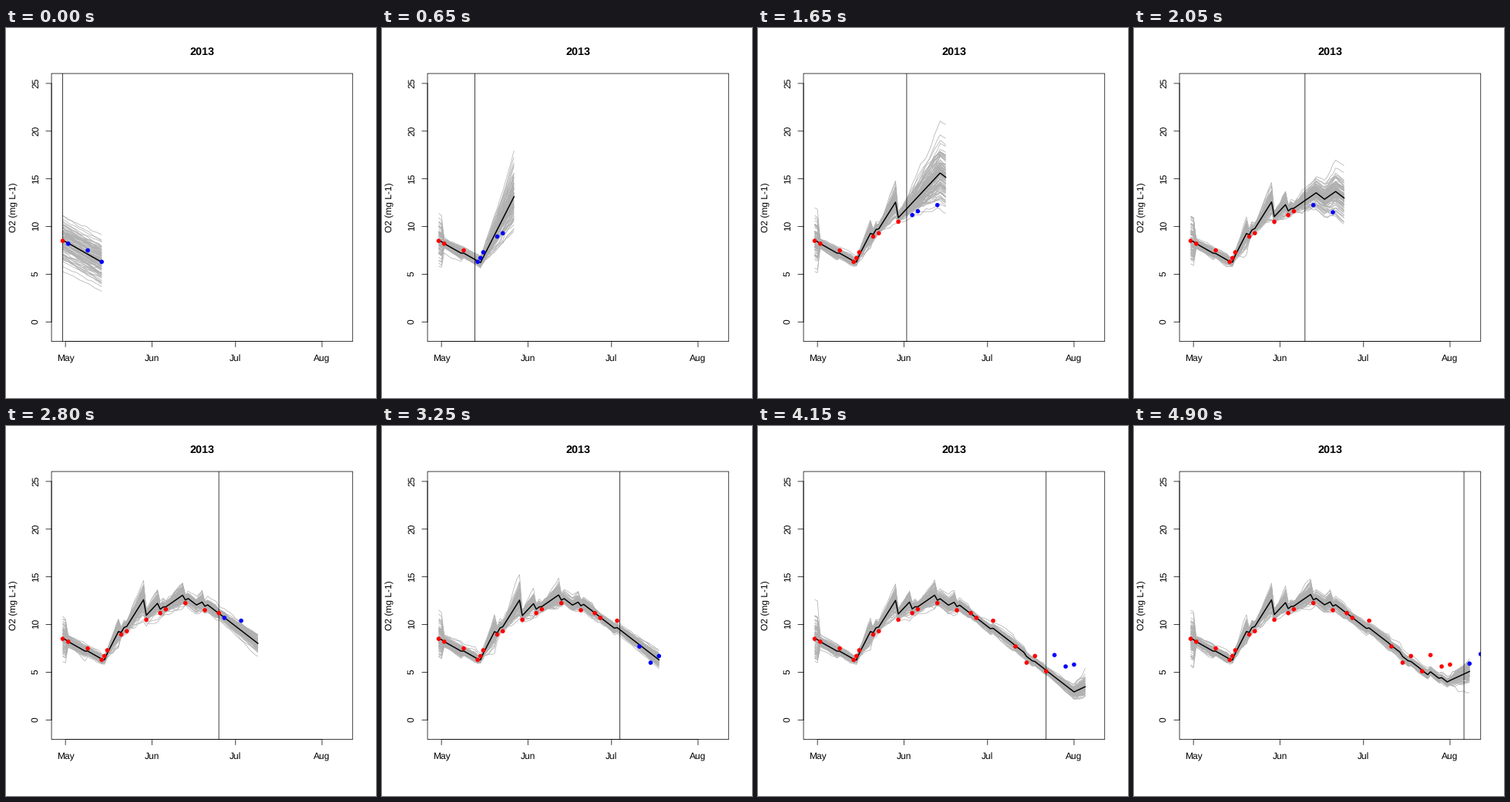
These frames come from a looping animation (480 by 480 pixels, 4950 ms). A matplotlib script:

```python
import numpy as np
import matplotlib.pyplot as plt
from matplotlib.animation import FuncAnimation
from matplotlib.collections import LineCollection
from matplotlib.patches import Rectangle

plt.rcParams["font.family"] = "Liberation Sans"
plt.rcParams["text.hinting"] = "none"

SIZE, DPI = 480, 72
FRAMES, INTERVAL = 99, 50
LEFT, RIGHT, TOP, BOTTOM = 59.04, 449.76, 59.04, 406.56
THIN, THICK = 0.75, 1.5
LAST_DAY, HORIZON, MEMBERS = 100, 14, 100
OBS_SD, JITTER_SD = 0.45, 0.25

# weekly sampling with a few extra visits
DAYS = np.array(sorted({*range(2, 59, 7), *range(72, 101, 7), *range(76, 91, 7),
                        0, 14, 15, 21, 35, 56, 64, 104}))
OXYGEN = np.array([8.5, 8.2, 7.5, 6.3, 6.7, 7.3, 8.95, 9.3, 10.5, 11.2, 11.6,
                   12.25, 11.5, 11.2, 10.7, 10.4, 7.7, 6, 6.7, 5.1, 6.8, 5.6,
                   5.8, 5.9, 6.9])
MEASURED = dict(zip(DAYS, OXYGEN))


def px(day):
    return LEFT + (np.asarray(day) + 4) / 108 * (RIGHT - LEFT)


def py(value):
    return BOTTOM - (np.asarray(value) + 2.04) / 28.08 * (BOTTOM - TOP)


def is_bright(day):
    return 15 <= day < 45 or 48 <= day < 52 or day >= 93


def production(day):
    """Daily growth as learned from the measurements up to a day."""
    return 0.36 + 0.44 * np.exp(-(max(day - 14, 0) / 16.8) ** 2)


def simulate(today):
    """Ensemble filter up to today, then a free forecast."""
    rng = np.random.default_rng(700 + today)
    end = min(today + HORIZON, LAST_DAY)
    mean, dev = 8.58, rng.normal(0, 1.1, MEMBERS)
    means, members = [], []
    for day in range(end + 1):
        measured = day in MEASURED and day <= today
        if measured:
            growth = production(day)
            growth_dev, loss_dev = rng.normal(size=(2, MEMBERS))
        if measured and day > 0:
            gain = dev.var() / (dev.var() + OBS_SD ** 2)
            mean += gain * (MEASURED[day] - mean)
            dev = (1 - gain) * dev + gain * rng.normal(0, JITTER_SD, MEMBERS)
        dev = dev - dev.mean()
        means.append(mean)
        members.append(mean + dev)

        bright = is_bright(day)
        mean += growth * bright - (0.165 if day < 15 else 0.225)
        dev = (dev + 0.17 * growth * bright * growth_dev + 0.018 * loss_dev
               + rng.normal(0, 0.15 if bright else 0.06, MEMBERS))
    return px(np.arange(end + 1)), py(means), py(members).T


fig = plt.figure(figsize=(SIZE / DPI, SIZE / DPI), dpi=DPI, facecolor="white")
ax = fig.add_axes([0, 0, 1, 1])
ax.set_xlim(0, SIZE)
ax.set_ylim(SIZE, 0)
ax.axis("off")


def plot_box(**style):
    return Rectangle((LEFT, TOP), RIGHT - LEFT, BOTTOM - TOP, **style)


def rule(xs, ys):
    ax.plot(xs, ys, color="black", lw=THIN, snap=False,
            solid_capstyle="round", zorder=6)


def label(x, y, text, **style):
    ax.text(x, y, text, ha="center", va="baseline",
            rotation_mode="anchor", **{"fontsize": 12, **style})


ax.add_patch(plot_box(fill=False, ec="black", lw=THIN, snap=False, zorder=6))

rule([LEFT, LEFT], py([0, 25]))
for value in range(0, 26, 5):
    y = float(py(value))
    rule([LEFT - 7.2, LEFT], [y, y])
    label(41.8, y - 0.8, str(value), rotation=90)

rule(px([1, 93]), [BOTTOM, BOTTOM])
for day, month in ((1, "May"), (32, "Jun"), (62, "Jul"), (93, "Aug")):
    x = float(px(day))
    rule([x, x], [BOTTOM, BOTTOM + 7.2])
    label(x, 432, month)

label(254.4, 35, "2013", fontsize=14.4, fontweight="bold")
label(13.8, 232.8, "O2 (mg L-1)", rotation=90)

spread = LineCollection([], colors="#b0b0b0", linewidths=THIN, zorder=1)
ax.add_collection(spread, autolim=False)
mean_line, = ax.plot([], [], color="black", lw=THICK, zorder=2,
                     solid_joinstyle="round")
now_line, = ax.plot([], [], color="black", lw=THIN, snap=False, zorder=3)
dots = ax.scatter([], [], s=5.6 ** 2, linewidths=0, zorder=4)
moving = (spread, mean_line, now_line, dots)

window = plot_box(transform=ax.transData)
for artist in moving:
    artist.set_clip_path(window)


def draw(today):
    xs, mean, members = simulate(today)
    spread.set_segments([np.column_stack((xs, ys)) for ys in members])
    mean_line.set_data(xs, mean)
    now_line.set_data(px([today, today]), [TOP, BOTTOM])
    shown = DAYS <= today + HORIZON
    dots.set_offsets(np.column_stack((px(DAYS), py(OXYGEN)))[shown])
    dots.set_facecolors(["red" if day <= today else "blue"
                         for day in DAYS[shown]])
    return moving


anim = FuncAnimation(fig, draw, frames=FRAMES, interval=INTERVAL,
                     repeat=True, repeat_delay=0)
plt.show()
```
